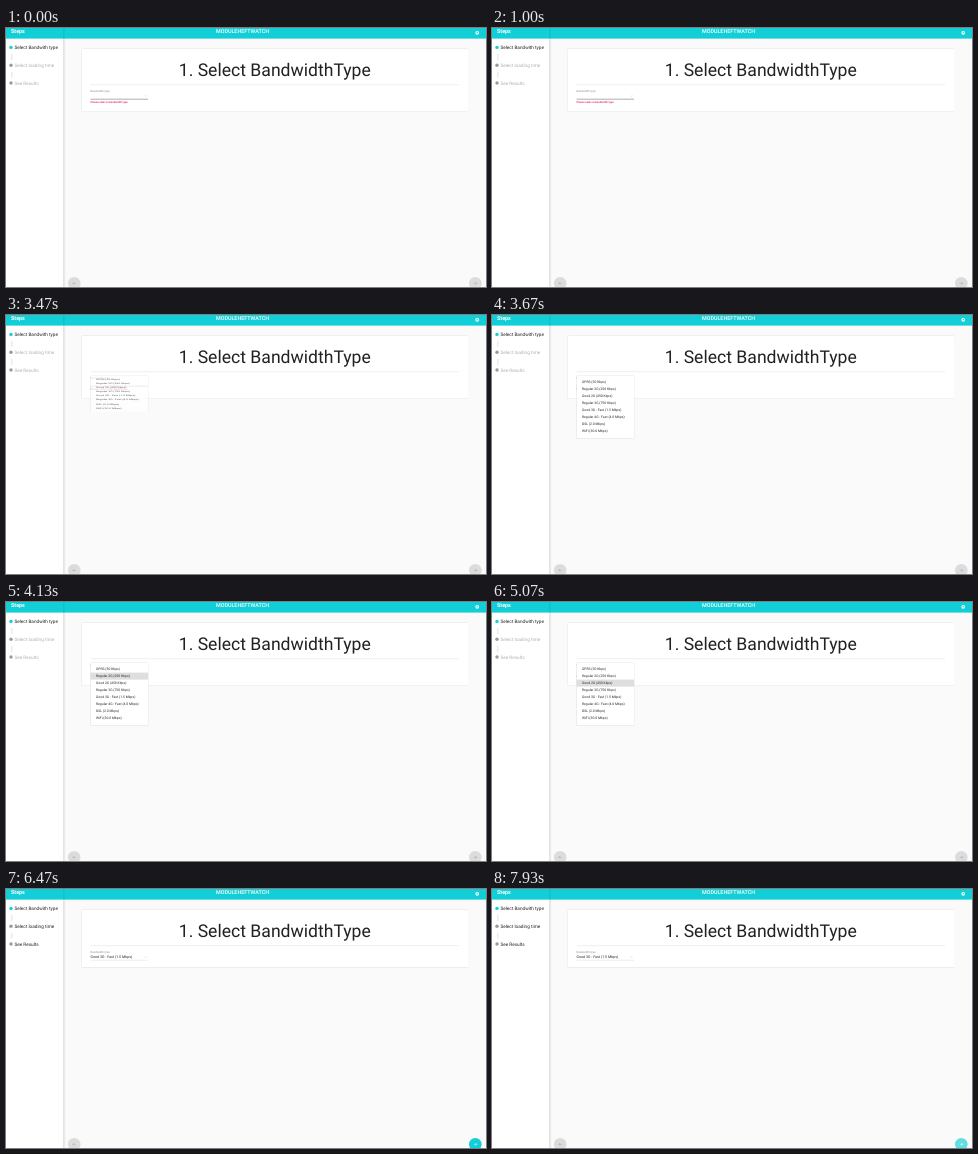
These frames come from a looping animation (480x259 px, 8000 ms). An HTML page:

```html
<!DOCTYPE html>
<html lang="en">
<head>
<meta charset="utf-8">
<title>Bandwidth steps</title>
<style>
  html, body { margin: 0; width: 100%; height: 100%; overflow: hidden; background: #fafafa; }
  svg { display: block; width: 100vw; height: 100vh; }
  text { font-family: Roboto, Arial, sans-serif; text-rendering: geometricPrecision; fill: #212121; }
  .raised { fill: #fff; filter: drop-shadow(0 .5px .6px rgba(0, 0, 0, .25)); }
</style>
</head>
<body>
<svg id="stage" viewBox="0 0 480 259"></svg>
<script>
const LOOP = 8000;
const CYAN = '#12ced6';
const ROW = 7, MENU_X = 84.5, MENU_Y = 60.8;
const OPTIONS = [
  'GPRS (50 Kbps)', 'Regular 2G (250 Kbps)', 'Good 2G (450 Kbps)', 'Regular 3G (750 Kbps)',
  'Good 3G - Fast (1.5 Mbps)', 'Regular 4G - Fast (4.0 Mbps)', 'DSL (2.0 Mbps)', 'WiFi (30.0 Mbps)'
];
// time, vertical scale, opacity
const MENU_STEPS = [[0, .58, 0], [3470, .58, .75], [3530, .86, .92], [3600, 1, 1], [6200, 1, .5], [6270, 1, 0]];
// time, highlighted row
const HOVER_STEPS = [[0, -1], [3730, 1], [4470, 0], [4600, 1], [5070, 2], [5200, 3], [5270, 4], [5330, 5], [5400, 4]];

const stage = document.getElementById('stage');

function add(tag, attrs, parent = stage) {
  const el = document.createElementNS('http://www.w3.org/2000/svg', tag);
  for (const key in attrs) el.setAttribute(key, attrs[key]);
  return parent.appendChild(el);
}
function rect(x, y, width, height, fill, parent) {
  return add('rect', { x, y, width, height, fill }, parent);
}
function label(str, x, y, size, attrs = {}, parent) {
  const el = add('text', { x, y, 'font-size': size, ...attrs }, parent);
  el.textContent = str;
  return el;
}
function line(d, stroke, width, parent) {
  return add('path', { d, stroke, 'stroke-width': width, fill: 'none' }, parent);
}
function stepAt(table, t) {
  return table.reduce((last, row) => row[0] <= t ? row : last);
}
function ramp(t, from, to) {
  const p = Math.min(1, Math.max(0, (t - from) / (to - from)));
  return p * p * (3 - 2 * p);
}
function mix(a, b, p) {
  return 'rgb(' + a.map((v, i) => Math.round(v + (b[i] - v) * p)) + ')';
}

rect(0, 0, 480, 259, '#fafafa');

// Sidebar
rect(0, 0, 57.6, 259, '#fff');
rect(57.5, 10, .9, 249, '#cbcbcb');
rect(58.4, 10, .8, 249, '#ececec');
const laterSteps = ['Select Bandwith type', 'Select loading time', 'See Results'].map((str, i) => {
  const y = 19.4 + i * 17.8;
  add('circle', { cx: 5, cy: y, r: 1.7, fill: i ? '#9a9a9a' : CYAN });
  if (i) line(`M5.8 ${y - 11.2}v6`, '#c4c4c4', .5);
  return label(str, 8.4, y + 1.6, 4.7);
}).slice(1);

// Top bar
rect(0, 0, 480, 10.6, CYAN);
rect(57.5, 0, .8, 10.6, 'rgba(0,0,0,.12)');
label('Steps', 5, 5.4, 5.4, { 'font-weight': 700, style: 'fill:#fff' });
label('MODULEHEFTWATCH', 236.5, 5.3, 5.4, { 'font-weight': 500, 'text-anchor': 'middle', style: 'fill:#fff' });
add('circle', { cx: 471.2, cy: 4.8, r: 1.3, fill: 'none', stroke: '#fff', 'stroke-width': 1.1 });

// Card
const card = add('rect', { x: 75.8, y: 20.8, width: 386.2, height: 63, rx: .6, class: 'raised' });
label('1. Select BandwidthType', 268.8, 48.2, 17.6, { 'text-anchor': 'middle' });
line('M84.5 56.7H453', '#e4e4e4', .6);
label('Bandwidth type', 84.5, 63.8, 2.8, { style: 'fill:#8a8a8a' });
const value = label('Good 3G - Fast (1.5 Mbps)', 84.5, 69, 3.58);
const underline = line('M84.5 71.2H142', '#777', .6);
const error = label('Please select a bandwidth type', 84.5, 75, 2.7, { 'font-weight': 500, style: 'fill:#e0195a' });
line('M138.8 67.6l.8 .8 .8 -.8', '#aaa', .4);

// Option menu
const menu = add('g', {});
add('rect', { x: MENU_X, y: MENU_Y, width: 57.7, height: 62.6, rx: .5, class: 'raised' }, menu);
const hover = rect(MENU_X, 0, 57.7, ROW, '#dedede', menu);
OPTIONS.forEach((str, i) => label(str, 90, 68.3 + i * ROW, 3.38, {}, menu));

// Round buttons
function button(cx, arrow, color) {
  const disc = add('circle', { cx, cy: 255.3, r: 6.3, fill: '#dcdcdc' });
  const mark = line(arrow, color, .5);
  return { disc, mark };
}
button(68.2, 'M69.8 255.3h-3m1.2 -1.2l-1.2 1.2l1.2 1.2', '#a2a2a2');
const next = button(469.3, 'M467.8 255.3h3m-1.2 -1.2l1.2 1.2l-1.2 1.2', '#a2a2a2');

function render(t) {
  const [, scale, opacity] = stepAt(MENU_STEPS, t);
  menu.setAttribute('opacity', opacity);
  menu.setAttribute('transform', `translate(0 ${MENU_Y}) scale(1 ${scale}) translate(0 ${-MENU_Y})`);

  const row = stepAt(HOVER_STEPS, t)[1];
  hover.setAttribute('opacity', row < 0 ? 0 : 1);
  hover.setAttribute('y', 63.8 + 6.8 + (row - 1) * ROW);
  hover.setAttribute('fill', mix([222, 222, 222], [198, 198, 198], ramp(t, 6000, 6130)));

  const done = ramp(t, 6200, 6430);
  card.setAttribute('height', 63 - 5.2 * done);
  value.setAttribute('opacity', t < 6200 ? 0 : 1);
  error.setAttribute('opacity', 1 - done);
  underline.setAttribute('stroke', mix([119, 119, 119], [226, 226, 226], done));
  laterSteps.forEach(el => el.style.fill = mix([176, 176, 176], [33, 33, 33], done));

  const lit = ramp(t, 7600, 7930);
  next.disc.setAttribute('fill', done < 1
    ? mix([220, 220, 220], [18, 206, 214], done)
    : mix([18, 206, 214], [98, 222, 227], lit));
  next.mark.setAttribute('stroke', mix([162, 162, 162], [255, 255, 255], done));
}

const start = performance.now();
function tick() {
  render((performance.now() - start) % LOOP);
  requestAnimationFrame(tick);
}
tick();
</script>
</body>
</html>
```
